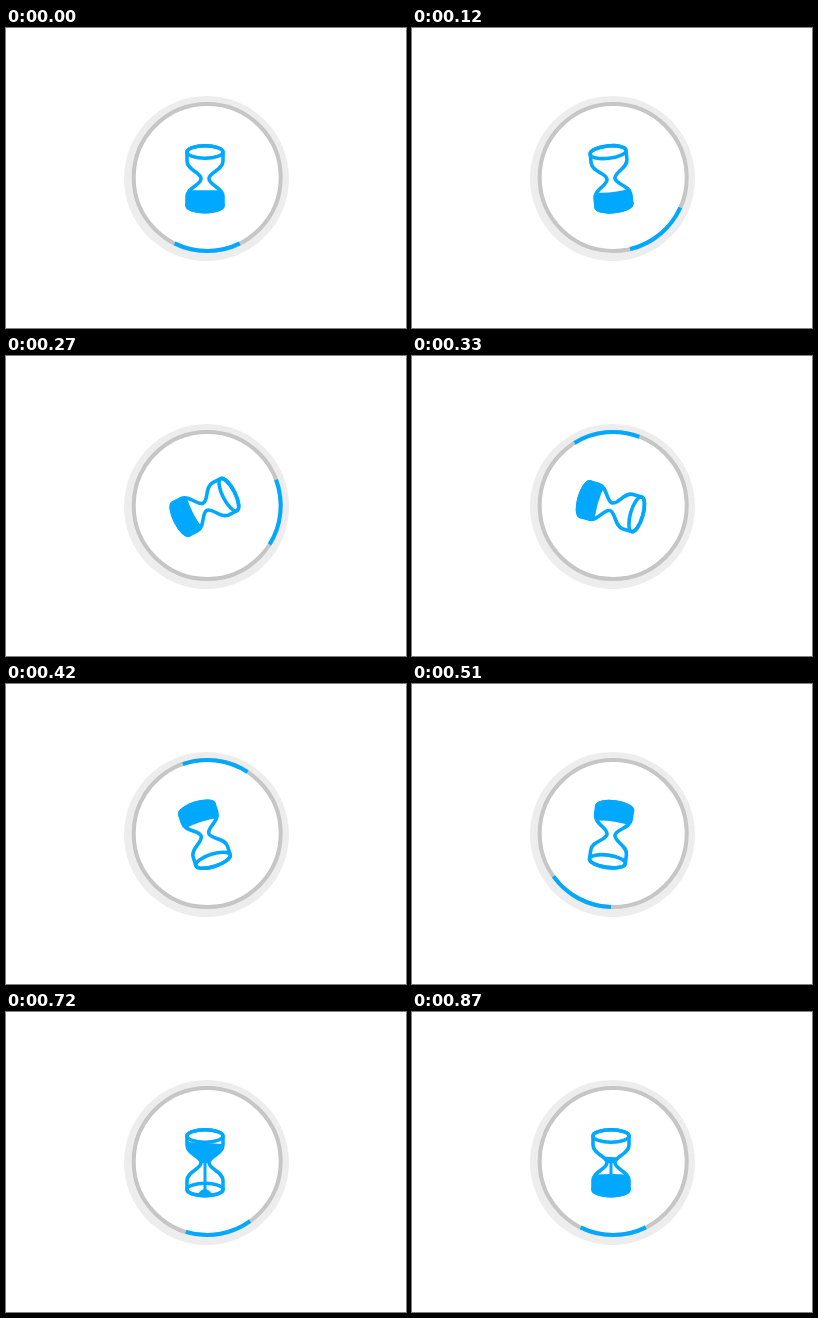
An HTML page for the animation above (0.9 s loop, 400 by 300 pixels).

```html
<!DOCTYPE html>
<html lang="en">
<head>
<meta charset="utf-8">
<title>Hourglass loader</title>
<style>
  html, body { margin: 0; width: 100%; height: 100%; overflow: hidden; background: #fff; }
  svg { display: block; width: 400px; height: 300px; }
  .line { fill: none; stroke: #00a9ff; stroke-width: 3.6; stroke-linejoin: round; }
  .sand { fill: #00a9ff; }
</style>
</head>
<body>
<svg viewBox="0 0 400 300">
  <defs>
    <path id="glass" d="M181 124 V133 C181 142 195 144.500 195 150.750 C195 157 181 159.500 181 168.500 V177.500
      A18 6.200 0 0 0 217 177.500 V168.500 C217 159.500 203 157 203 150.750 C203 144.500 217 142 217 133 V124
      A18 6.200 0 0 0 181 124 Z"/>
    <clipPath id="inside"><use href="#glass"/></clipPath>
  </defs>
  <circle cx="200.500" cy="150.500" r="82.500" fill="#ededed"/>
  <circle cx="201.200" cy="149.500" r="73.500" fill="#fff" stroke="#c6c6c6" stroke-width="4"/>
  <path id="arc" fill="none" stroke="#00a9ff" stroke-width="4"/>
  <g id="timer">
    <g clip-path="url(#inside)">
      <path id="top" class="sand"/>
      <path id="bottom" class="sand"/>
      <rect id="stream" class="sand" x="197.500" y="148" width="3"/>
    </g>
    <use href="#glass" class="line"/>
    <ellipse class="line" cx="199" cy="124" rx="18" ry="6.200"/>
    <ellipse class="line" cx="199" cy="177.500" rx="18" ry="6.200"/>
  </g>
</svg>
<script>
const LOOP = 900, STEP = 30, FLIPPED = 570;
const $ = id => document.getElementById(id);
const [arc, timer, top_, bottom, stream] = ['arc', 'timer', 'top', 'bottom', 'stream'].map($);

// [time, degrees]: wind back, spin past the end, settle
const ringKeys = [[0, 0], [128, -40], [534, 1118], [695, 1070], [850, 1080], [LOOP, 1080]];
const turnKeys = [[0, 0], [95, -8], [520, 188], [FLIPPED, 180]];

const clamp = x => Math.min(1, Math.max(0, x));
const mix = (a, b, x) => a + (b - a) * x;
const ease = x => (1 - Math.cos(Math.PI * x)) / 2;

function at(keys, t) {
  let i = 1;
  while (i < keys.length - 1 && t > keys[i][0]) i++;
  const [t0, a] = keys[i - 1], [t1, b] = keys[i];
  return mix(a, b, ease(clamp((t - t0) / (t1 - t0))));
}

function ringPoint(deg) {
  const a = deg * Math.PI / 180;
  return `${201.2 + 73.5 * Math.cos(a)} ${149.5 + 73.5 * Math.sin(a)}`;
}

// Sand below a curved surface with the given side and middle heights
const heap = (side, mid) => `M179 ${side} Q199 ${2 * mid - side} 219 ${side} V300 H179 Z`;

function draw(t) {
  const mid = 90 + at(ringKeys, t);
  arc.setAttribute('d', `M${ringPoint(mid - 26.3)} A73.5 73.5 0 0 1 ${ringPoint(mid + 26.3)}`);

  if (t < FLIPPED) {
    const dip = 2 * clamp(t / 90);
    timer.setAttribute('transform', `rotate(${at(turnKeys, t)} 199 150.75)`);
    top_.setAttribute('d', '');
    bottom.setAttribute('d', heap(162.3, 162.3 + dip));
    stream.setAttribute('height', 0);
    return;
  }

  const drain = (t - FLIPPED) / 300;
  const level = mix(117, 145, drain);
  timer.removeAttribute('transform');
  top_.setAttribute('d', `M179 ${level - 1} L219 ${level + 1} V151 H179 Z`);
  stream.setAttribute('height', 36 * clamp((t - FLIPPED) / 60));
  const fill = (t - 720) / 150;
  bottom.setAttribute('d', t < 620 ? '' : heap(mix(215, 163, fill), mix(177, 162, fill)));
}

const start = performance.now();
function tick() {
  const t = (performance.now() - start) % LOOP;
  draw(Math.floor(t / STEP) * STEP);
  requestAnimationFrame(tick);
}
tick();
</script>
</body>
</html>
```
